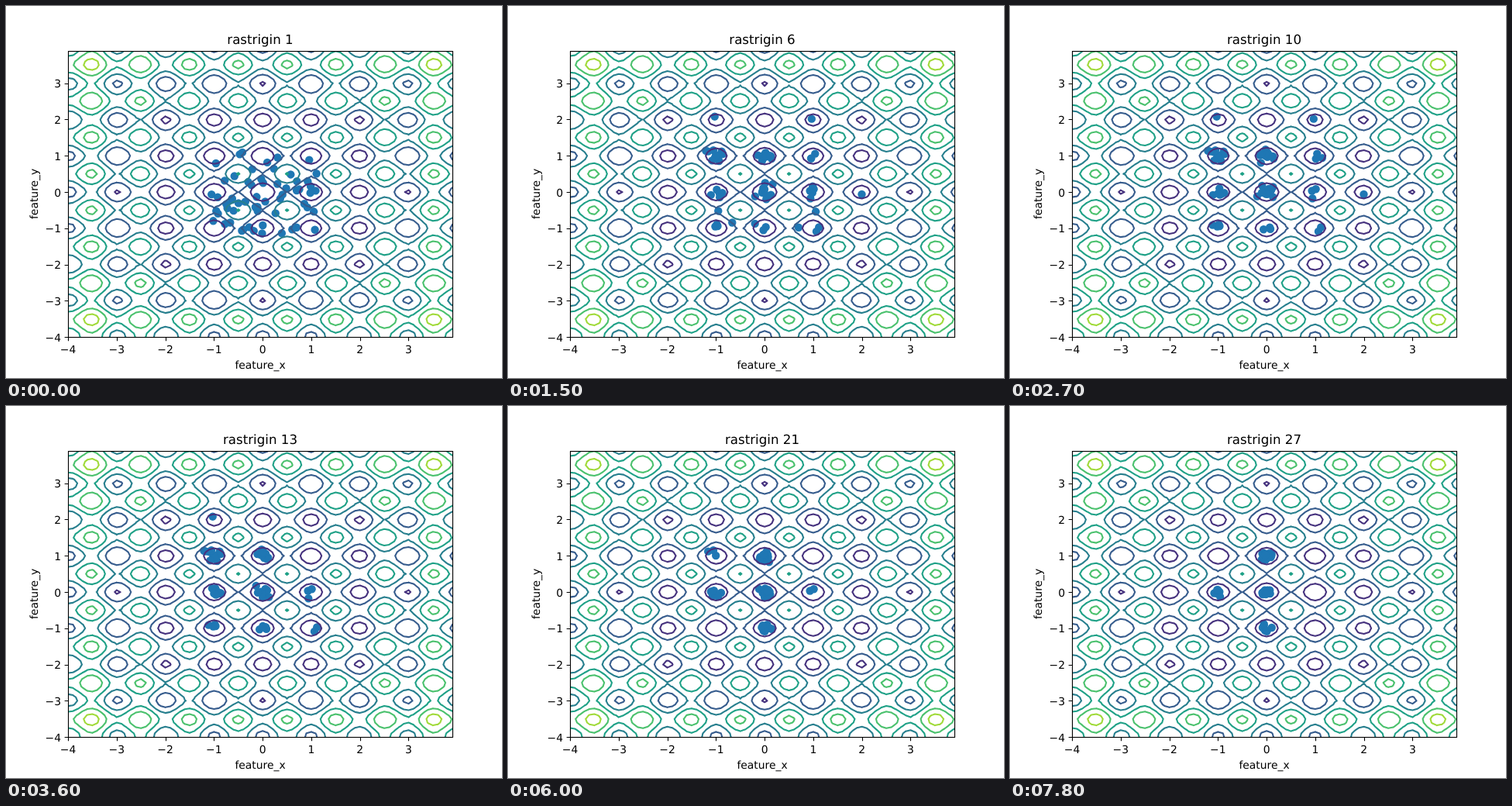
An HTML page that plays this animation: 640x480 px, repeating every 8 s.

```html
<!DOCTYPE html>
<html lang="en">
<head>
<meta charset="utf-8">
<title>rastrigin</title>
<style>
html, body { margin: 0; width: 100%; height: 100%; overflow: hidden; background: #fff; }
svg { display: block; width: 640px; height: 480px; }
text { font: 13.89px "DejaVu Sans", sans-serif; text-rendering: geometricPrecision; }
#title { font-size: 16.67px; }
</style>
</head>
<body>
<svg viewBox="0 0 640 480">
  <clipPath id="box"><rect x="80" y="58" width="496" height="369"/></clipPath>
  <g clip-path="url(#box)">
    <g id="dots" fill="#1f77b4"></g>
    <g id="lines" fill="none" stroke-width="2.083" stroke-linecap="round"></g>
  </g>
  <g id="axes" fill="none" stroke="#000" stroke-width="1.11">
    <rect x="80.5" y="58.5" width="496" height="369"/>
  </g>
  <g id="labels">
    <text id="title" x="328" y="49" text-anchor="middle"></text>
    <text x="328" y="468" text-anchor="middle">feature_x</text>
    <text transform="translate(41 242.4) rotate(-90)" text-anchor="middle">feature_y</text>
  </g>
</svg>
<script>
const LOOP = 8000, STEP = 300, SPAN = 7.9;
const px = x => 80 + (x + 4) * 496 / SPAN;
const py = y => 427.2 - (y + 4) * 369.6 / SPAN;
const $ = id => document.getElementById(id);

function add(parent, tag, attrs, text) {
  const el = document.createElementNS('http://www.w3.org/2000/svg', tag);
  for (const k in attrs) el.setAttribute(k, attrs[k]);
  if (text) el.textContent = text;
  return parent.appendChild(el);
}

// Contours: marching squares on a 0.1 grid
const N = 80;
const at = i => -4 + i / 10;
const wave = v => v * v + 10 - 10 * Math.cos(2 * Math.PI * v);
const height = (i, j) => wave(at(i)) + wave(at(j)) + 1e-6;

function contour(level) {
  let d = '';
  for (let i = 0; i < N - 1; i++) {
    for (let j = 0; j < N - 1; j++) {
      const c = [[i, j], [i + 1, j], [i + 1, j + 1], [i, j + 1]];
      const z = c.map(p => height(...p));
      const cuts = [];
      for (let k = 0; k < 4; k++) {
        const m = (k + 1) % 4;
        if (z[k] > level === z[m] > level) continue;
        const t = (level - z[k]) / (z[m] - z[k]);
        const x = c[k][0] + t * (c[m][0] - c[k][0]);
        const y = c[k][1] + t * (c[m][1] - c[k][1]);
        cuts.push(px(at(x)).toFixed(2) + ' ' + py(at(y)).toFixed(2));
      }
      if (cuts.length === 4) {
        const mid = (z[0] + z[1] + z[2] + z[3]) / 4;
        if (z[0] > level !== mid > level) cuts.unshift(cuts.pop());
      }
      for (let k = 0; k < cuts.length; k += 2) d += `M${cuts[k]}L${cuts[k + 1]}`;
    }
  }
  return d;
}

['#46327e', '#365c8d', '#277f8e', '#1fa187', '#4ac16d', '#a0da39'].forEach((stroke, i) =>
  add($('lines'), 'path', { d: contour(10 * (i + 1)), stroke }));

// Ticks
const snap = v => Math.floor(v + 0.5) + 0.5;
for (let v = -4; v < 4; v++) {
  const name = String(v).replace('-', '\u2212');
  const x = snap(px(v)), y = snap(py(v));
  add($('axes'), 'path', { d: `M${x} 427.5v4.86M80.5 ${y}h-4.86` });
  add($('labels'), 'text', { x: px(v), y: 448, 'text-anchor': 'middle' }, name);
  add($('labels'), 'text', { x: 71, y: Math.round(py(v) + 5.5), 'text-anchor': 'end' }, name);
}

// Population: dots start scattered, drop into wells, then leave the weaker wells
const GENS = Math.ceil(LOOP / STEP);
const WELLS = [
  { x: 0, y: 0, size: 12 }, { x: 0, y: 1, size: 11 },
  { x: -1, y: 0, size: 4 }, { x: 0, y: -1, size: 4 },
  { x: -1, y: 1, size: 12, last: 23 }, { x: -1, y: -1, size: 4, last: 23 },
  { x: 1, y: 0, size: 3, last: 25 }, { x: 1, y: 1, size: 5, last: 12 },
  { x: 1, y: -1, size: 2, last: 19 }, { x: 2, y: 0, size: 1, last: 16 },
  { x: -1, y: 2, size: 1, last: 16 }, { x: 1, y: 2, size: 1, last: 16 },
];
const CORE = WELLS.filter(w => !w.last);
const total = list => list.reduce((sum, w) => sum + w.size, 0);

let seed = 11;
function rand() {
  seed = (seed * 1664525 + 1013904223) % 4294967296;
  return seed / 4294967296;
}

function pick(list, share) {
  let left = share * total(list);
  return list.find(w => (left -= w.size) < 0);
}

function track(i, count) {
  let x = 2.3 * (rand() - 0.5), y = 2.3 * (rand() - 0.5);
  let stay = 1 + Math.floor(8 * rand() ** 2), settled = false;
  const path = [];
  for (let gen = 1; gen <= GENS; gen++) {
    if (gen > stay) {
      const well = settled ? pick(CORE, rand()) : pick(WELLS, (i + 0.5) / count);
      const reach = 0.26 - 0.006 * gen;
      x = well.x + reach * (rand() + rand() - 1);
      y = well.y + reach * (rand() + rand() - 1);
      stay = well.last ? well.last * (1 - 0.4 * rand()) : gen + 3 + 7 * rand();
      settled = true;
    }
    path.push([px(x), py(y)]);
  }
  return path;
}

const count = total(WELLS);
const dots = Array.from({ length: count }, (_, i) =>
  ({ path: track(i, count), el: add($('dots'), 'circle', { r: 5.2 }) }));

let shown = -1;
function frame() {
  const gen = Math.floor(performance.now() % LOOP / STEP);
  if (gen !== shown) {
    shown = gen;
    $('title').textContent = 'rastrigin ' + (gen + 1);
    for (const { path, el } of dots) {
      el.setAttribute('cx', path[gen][0]);
      el.setAttribute('cy', path[gen][1]);
    }
  }
  requestAnimationFrame(frame);
}
frame();
</script>
</body>
</html>
```
